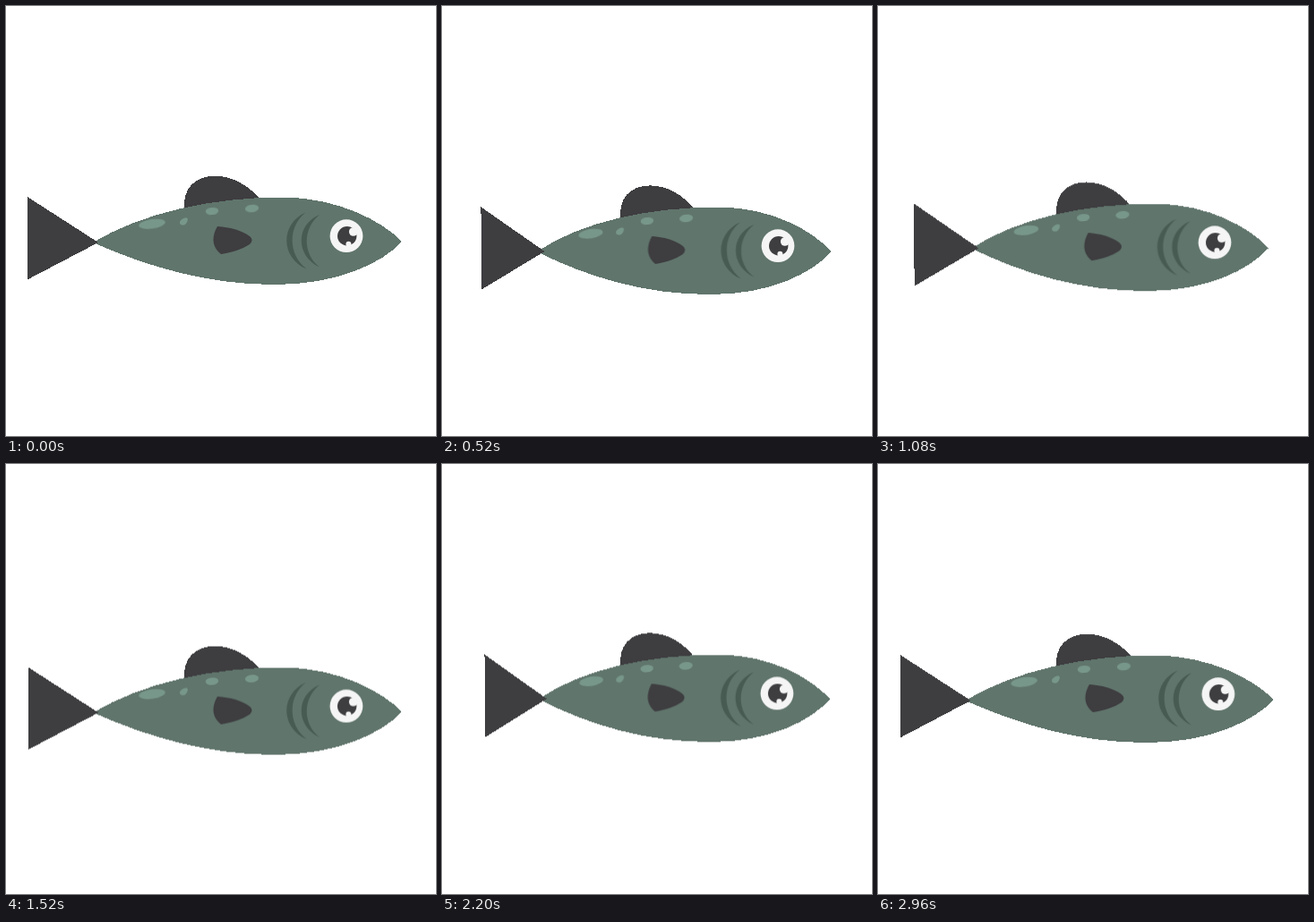
Write an HTML page without scripts that moves like this. It is 480 by 480 pixels and loops after 3 s.

```html
<!DOCTYPE html>
<html lang="en">
<head>
<meta charset="utf-8">
<title>Swimming fish</title>
<style>
  html, body { margin: 0; width: 100%; height: 100%; overflow: hidden; background: #fff; }
  svg { display: block; width: 100%; height: 100%; }

  .dark { fill: #3e3d40; }
  .skin { fill: #60756c; }
  .spot { fill: #78978b; }
  .gill { fill: #485b53; }
  .white { fill: #f5f5f5; }

  /* whole fish drifts up and down */
  .fish { animation: drift 3s cubic-bezier(.33, 0, .67, 1) infinite; }
  @keyframes drift {
    0%, 100% { transform: translateY(0); }
    16.7% { transform: translateY(11px); }
    34% { transform: translateY(7px); }
    53.7% { transform: translateY(14px); }
    78.7% { transform: translateY(-2.6px); }
    87.3% { transform: translateY(2.4px); }
  }

  /* body contracts lengthwise and relaxes again */
  .tail, .body, .dorsal, .squeeze {
    animation: squeeze .75s cubic-bezier(.25, .15, .6, .9) infinite alternate;
  }
  .tail { animation-name: tail; }
  .body { animation-name: body; }
  .dorsal { animation-name: dorsal; }
  .tail, .body, .dorsal { shape-rendering: crispEdges; }
  .squeeze { transform-origin: var(--ox, 0) 0; }
  @keyframes squeeze {
    to { transform: translateX(var(--dx, 0px)) scaleX(var(--sx, 1)); }
  }
  @keyframes tail {
    to { d: path("M48 213.3L117.2 262.7L49 305.5Z"); }
  }
  @keyframes body {
    to { d: path("M108 263C157 229.5 230 213.5 310 213.5C368 214 412 240 433 263C412 287 366 311 300 311C227 311 164 292 108 263Z"); }
  }
  @keyframes dorsal {
    to { d: path("M199.5 228C196 203 211 189.3 231.5 189.3C251 189.3 269 200 281.5 216L270 224Z"); }
  }
</style>
</head>
<body>
<svg viewBox="0 0 480 480">
  <g class="fish">
    <path class="dark dorsal" d="M199.5 228C196 203 212 189.8 233.5 189.8C253 189.8 271 200.5 284 216L270 224Z"/>
    <path class="skin body" d="M97 264C153 230.5 230 213.5 310 213.5C370 214 420 240 442 263C420 287 370 311 300 311C225 311 158 291 97 264Z"/>
    <path class="dark tail" d="M24.3 213.3L103 264L24.3 305.2Z"/>

    <g class="spot">
      <g class="squeeze" style="--ox:163px;--dx:3.8px;--sx:.9">
        <ellipse cx="163" cy="243.2" rx="14.8" ry="5.2" transform="rotate(-8 163 243.2)"/>
      </g>
      <path class="squeeze" style="--dx:.3px" d="M194 241C195 238 199 236 202 236.5C204 238 202 243 199 244.5C196 245 193.5 244 194 241Z"/>
      <g class="squeeze" style="--dx:-1.3px">
        <ellipse cx="230" cy="229" rx="7.2" ry="4.1" transform="rotate(-5 230 229)"/>
      </g>
      <g class="squeeze" style="--dx:-2.3px">
        <ellipse cx="274.5" cy="226" rx="7.6" ry="4.2" transform="rotate(-6 274.5 226)"/>
      </g>
    </g>

    <path class="dark squeeze" style="--ox:231px;--dx:-1.8px;--sx:.95"
      d="M236 246C250 247 262 250 272 257Q277 261 272 266C263 272 252 275 240 277C230 269 229 258 236 246Z"/>

    <g class="gill squeeze" style="--dx:-2.2px">
      <path d="M334.5 230.5C306 243 306 281 335.5 293.5C314.5 278 314.5 246 334.5 230.5Z"/>
      <path d="M350 233C323 244 323 279 350 291.5C331 277 331 248 350 233Z"/>
    </g>

    <g class="squeeze" style="--dx:-6.2px">
      <circle class="white" cx="380" cy="256.7" r="18.4"/>
      <circle class="dark" cx="380.7" cy="256.8" r="10.7"/>
      <circle class="white" cx="387.7" cy="252" r="4.8"/>
      <circle class="white" cx="382.4" cy="265.7" r="3"/>
    </g>
  </g>
</svg>
</body>
</html>
```
